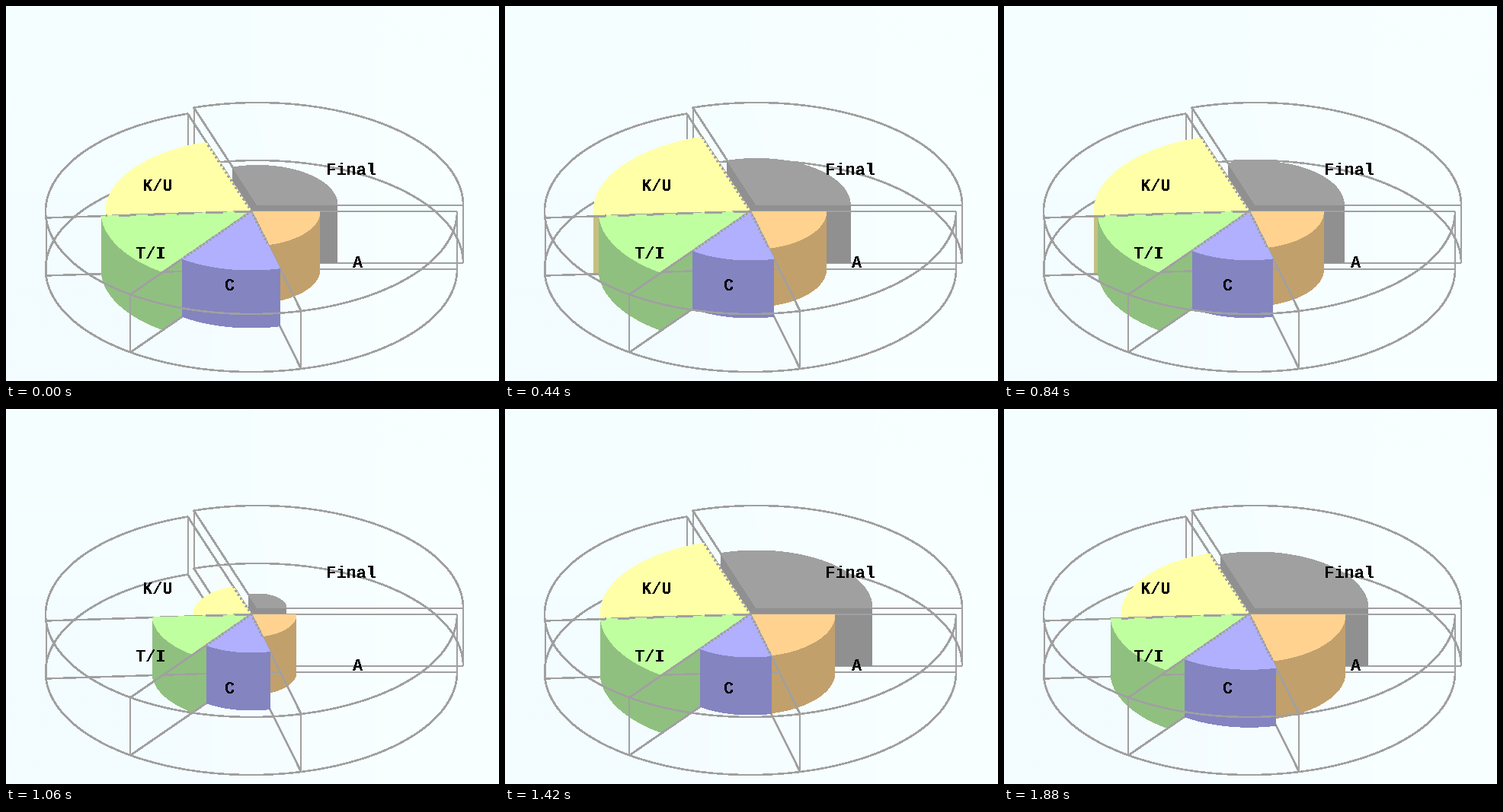
A matplotlib script that plays this animation: 647 px wide and 493 px high, repeating every 1.9 s.

```python
import numpy as np
import matplotlib.pyplot as plt
from matplotlib.animation import FuncAnimation
from matplotlib.collections import LineCollection, PolyCollection

W, H, DPI = 647, 493, 64
PX = 72 / DPI
FRAMES, STEP = 95, 20
R, DEPTH = 270, 76
HUB = np.array([322, 270])
WIRE = "#a0a0a0"

# name: start angle, end angle, centre, top colour, side colour (back to front)
SLICES = {
    "Final": (252, 360, HUB + (8, -8), "#a0a0a0", "#909090"),
    "K/U": (176.4, 252, HUB, "#ffffa8", "#c4c080"),
    "A": (0, 76, HUB, "#ffd290", "#c2a06c"),
    "T/I": (126, 176.4, HUB, "#c0ffa0", "#90c080"),
    "C": (76, 126, HUB, "#b0b0ff", "#8484c0"),
}
LABELS = {"Final": (453.5, 222), "K/U": (199, 243), "A": (461.5, 344),
          "T/I": (190, 332), "C": (294, 374)}

# slice radii at key times (ms)
TIMES = [0, 140, 280, 540, 640, 740, 1060, 1100, 1420, 1560, 1680, 1720, 1740, 1880]
RADII = {
    "Final": [105, 164, 117, 127, 132, 152, 38, 34, 152, 179, 200, 213, 210, 148],
    "K/U": [191, 205, 164, 232, 248, 262, 76, 72, 197, 221, 204, 196, 192, 168],
    "A": [90, 110, 94, 103, 107, 115, 59, 57, 111, 128, 140, 144, 143, 126],
    "T/I": [197, 205, 178, 212, 216, 230, 130, 126, 197, 219, 221, 215, 212, 182],
    "C": [154, 160, 128, 128, 128, 140, 100, 97, 112, 140, 162, 165, 163, 144.5],
}


def rim(c, r, a0, a1=None):
    """Point on the tilted rim, or an arc of points."""
    a = np.radians(a0 if a1 is None else np.linspace(a0, a1, 80))
    return np.stack([c[0] + r * np.cos(a), c[1] + r / 2 * np.sin(a)], -1)


def down(p):
    return np.asarray(p) + (0, DEPTH)


def frame_lines(c, a0, a1):
    """Outline of a full-size slice."""
    p, q, arc = rim(c, R, a0), rim(c, R, a1), rim(c, R, a0, a1)
    top = [np.array([c, p]), np.array([c, q]), arc]
    return top + [down(s) for s in top] + [np.array([e, down(e)]) for e in (p, q)]


def wires(lines, z, style="solid"):
    lc = LineCollection(lines, colors=WIRE, linewidths=1.5 * PX, linestyles=style,
                        antialiaseds=False, zorder=z)
    return ax.add_collection(lc)


def solid(color, z):
    pc = PolyCollection([], facecolors=color, edgecolors="none", linewidths=0,
                        antialiaseds=False, zorder=z)
    return ax.add_collection(pc)


fig = plt.figure(figsize=(W / DPI, H / DPI), dpi=DPI)
ax = fig.add_axes([0, 0, 1, 1])
ax.axis("off")

corners = np.array([[[245, 254, 255], [247, 255, 255]],
                    [[243, 252, 255], [248, 255, 255]]]) / 255
ax.imshow(corners, extent=(0, W, H, 0), interpolation="bilinear", aspect="auto", zorder=0)
ax.set_xlim(0, W)
ax.set_ylim(H, 0)

bodies = {}
for i, (name, (a0, a1, c, top, side)) in enumerate(SLICES.items()):
    z = 10 * (i + 1)
    lines = frame_lines(c, a0, a1)
    if name == "C":
        lines.append(np.array([(206, 349.7), (322, 346), (360, 346)]))
    wires(lines, z)
    bodies[name] = solid(side, z + 1), solid(top, z + 2)
wires([rim(HUB, R, 0, 176.4)], 60)

# broken lines where neighbouring slices meet: angle, slices
SEAMS = [(76, ("A", "C"), (1, 2)), (126, ("C", "T/I"), (1, 2)),
         (252, ("K/U",), (1, 3)), (176.4, ("T/I", "K/U"), (14, 11))]
seams = [wires([], 61, [(0, dash)]) for _, _, dash in SEAMS]

for name, (x, y) in LABELS.items():
    ax.text(x, y, name, family="Liberation Mono", weight="bold", size=22 * PX,
            ha="center", va="baseline", color="black", antialiased=False, zorder=70)


def draw(i):
    r = {n: np.interp(i * STEP, TIMES, v) for n, v in RADII.items()}
    for name, (a0, a1, c, _, _) in SLICES.items():
        face = np.vstack([[c], rim(c, r[name], a0, a1)])
        walls = [np.array([p, q, down(q), down(p)])
                 for p, q in zip(face, np.roll(face, -1, axis=0))]
        side, top = bodies[name]
        side.set_verts(walls + [down(face)])
        top.set_verts([face])
    for lc, (a, names, _) in zip(seams, SEAMS):
        lc.set_segments([np.array([HUB, rim(HUB, min(r[n] for n in names), a)])])
    return []


anim = FuncAnimation(fig, draw, frames=FRAMES, interval=STEP, repeat=True,
                     repeat_delay=0, blit=False)
plt.show()
```
